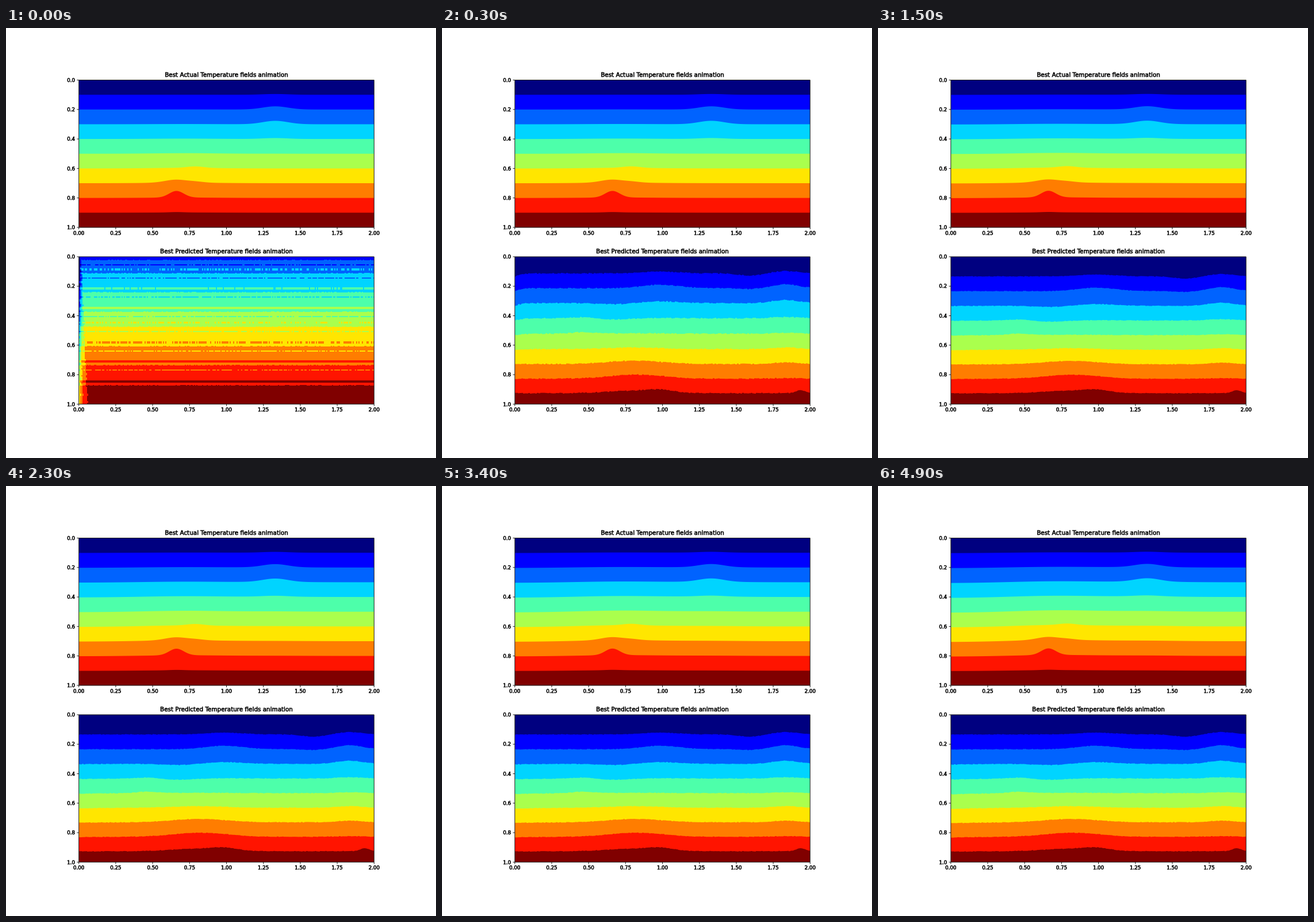
An HTML page with a canvas that plays this animation: 748x748 px, repeating every 5000 ms.

```html
<!DOCTYPE html>
<html lang="en">
<head>
<meta charset="utf-8">
<title>Temperature fields</title>
<style>
html, body { margin: 0; width: 100%; height: 100%; overflow: hidden; background: #fff; }
canvas, svg { position: absolute; left: 0; top: 0; width: 748px; height: 748px; }
text { font-family: "DejaVu Sans", sans-serif; font-size: 8.65px; stroke: #000; stroke-width: .6px; }
.title { font-size: 10.4px; }
.axis { fill: none; stroke: #000; stroke-width: .9; }
</style>
</head>
<body>
<canvas id="field" width="748" height="748"></canvas>
<svg id="axes" viewBox="0 0 748 748"></svg>
<script>
const LEFT = 127, RIGHT = 640, HEIGHT = 256.4, TOP = 90.5, LOW = 397.9;
const LOOP = 5000, STEP = 100;
const COLORS = ['#000080', '#0000ff', '#0063ff', '#00d4ff', '#4dffaa',
  '#aaff4d', '#ffe600', '#ff7d00', '#ff1400', '#800000'];
const ctx = document.getElementById('field').getContext('2d');

// Humps that lift the level lines: [height, x, width, line, spread over lines]
const ACTUAL = [
  [6.8, 468, 31, 1.55, 1.2],
  [3.6, 329, 21, 5.4, .7],
  [4.5, 294, 28, 6, .4],
  [11.5, 296, 18, 7, .6],
  [1, 310, 80, 5, 3]
];
const PREDICTED = [
  [6, 380, 45, 1, 1.2],
  [7, 335, 65, 6.8, 1.8],
  [7, 597, 32, 1.2, 1.6],
  [3, 597, 30, 5.5, 1.5],
  [3.5, 245, 25, 3.6, .8],
  [-4, 535, 28, 0, 1],
  [4, 380, 30, 8, .7],
  [5, 624, 11, 8, .4],
  [-3, 300, 40, 2.5, .8]
];

// Opening state: band tops, and how densely each next level shows ahead of them
const BANDS = [398, 404, 427, 460, 494, 520, 554, 587, 622];
const AHEAD = [0, 0, .5, .9, 1, .4, .6, 1, 1];

const bell = (x, c, w) => Math.exp(-(((x - c) / w) ** 2));
const fade = (x, w) => Math.exp((LEFT - x) / w);
const lift = (humps, k, x) =>
  humps.reduce((sum, [h, c, w, line, spread]) => sum + h * bell(x, c, w) * bell(k, line, spread), 0);

function rand(a, b) {
  const s = Math.sin(a * 127.1 + b * 311.7) * 43758.5453;
  return s - Math.floor(s);
}

function box(level, x, y, w, h) {
  ctx.fillStyle = COLORS[level];
  ctx.fillRect(x, y, w, h);
}

function layers(top, line) {
  const y0 = Math.round(top), y1 = Math.round(top + HEIGHT);
  box(0, LEFT, y0, RIGHT - LEFT, y1 - y0);
  for (let k = 0; k < 9; k++)
    for (let x = LEFT; x < RIGHT; x++) {
      const y = top + (k + 1) * HEIGHT / 10 + line(k, x);
      box(k + 1, x, y, 1, y1 - y);
    }
}

function actual(u) {
  layers(TOP, (k, x) => {
    const drift = 1.4 * bell(x, LEFT, 110) - 1.5 * bell(x, 310, 110) - .9 * bell(x, 468, 75);
    const growth = .3 + .85 * Math.sin(Math.PI * (k + .5) / 9);
    return u * growth * drift - lift(ACTUAL, k, x);
  });
}

function predicted(n, u) {
  const rest = Math.exp((1 - n) / 3);
  layers(LOW, (k, x) => {
    const sag = 8.6 - .03 * k * k;
    const early = 10.5 * rest / (1 + Math.exp((k - 3.9) * 1.1));
    const creep = 2 * u * Math.sin(Math.PI * k / 9) * fade(x, 60);
    const noise = (rand(x / 3 | 0, k) - .5) * (.9 + 1.2 * rest);
    return sag - lift(PREDICTED, k, x) - early * (1 - fade(x, 9)) + creep + noise;
  });
}

// Levels sink towards the cold left wall, more so with depth
function sunk(level, x, y) {
  const w = 1 + (y - LOW) / HEIGHT * 7;
  const wobble = rand(y >> 2, 5) * 2 - 1;
  return Math.max(0, level - Math.round(3 * Math.exp(-Math.max(0, x - LEFT + wobble) / w)));
}

function opening() {
  for (let x = LEFT; x < RIGHT; x += 2) {
    const w = Math.min(2, RIGHT - x);
    const put = (level, y0, y1) => {
      if (x > LEFT + 20) return box(level, x, y0, w, y1 - y0);
      for (let y = y0; y < y1; y++) box(sunk(level, x, y), x, y, w, 1);
    };
    BANDS.forEach((y, i) => {
      const comb = i && rand(x, i) > .7 ? 1 : 0;
      put(i + 1, y - comb, BANDS[i + 1] ?? 654);
    });
    // Each band edge echoes: the next level above it, the previous one below
    BANDS.forEach((y, i) => {
      if (!i) return;
      if (rand(x, i + 20) < AHEAD[i]) put(i + 1, y - 9, y - 6 + Math.round(AHEAD[i]));
      if (i < 8 && rand(x, i + 40) < .75) put(i, y + 7, y + 9);
    });
  }
}

function axes() {
  let out = '';
  const label = (s, x, y, anchor, cls = '') =>
    out += `<text x="${x}" y="${y}" text-anchor="${anchor}" class="${cls}">${s}</text>`;
  const panel = (name, top) => {
    const x0 = 126.7, w = 513.6;
    let d = `M${x0} ${top}h${w}v${HEIGHT}h${-w}z`;
    for (let i = 0; i < 9; i++) {
      const x = x0 + i * w / 8;
      d += `M${x} ${top + HEIGHT}v3.3`;
      label((i / 4).toFixed(2), x, top + HEIGHT + 12.7, 'middle');
    }
    for (let i = 0; i < 6; i++) {
      const y = top + i * HEIGHT / 5;
      d += `M${x0} ${y}h-3.3`;
      label((i / 5).toFixed(1), 120, y + 3.2, 'end');
    }
    out += `<path class="axis" d="${d}"/>`;
    label(`Best ${name} Temperature fields animation`, 383.5, top - 5.8, 'middle', 'title');
  };
  panel('Actual', TOP);
  panel('Predicted', LOW);
  document.getElementById('axes').innerHTML = out;
}

let shown = -1;
const start = performance.now();
function tick() {
  const n = Math.floor((performance.now() - start) % LOOP / STEP);
  if (n !== shown) {
    const u = n / (LOOP / STEP - 1);
    shown = n;
    actual(u);
    n ? predicted(n, u) : opening();
  }
  requestAnimationFrame(tick);
}
axes();
tick();
</script>
</body>
</html>
```
